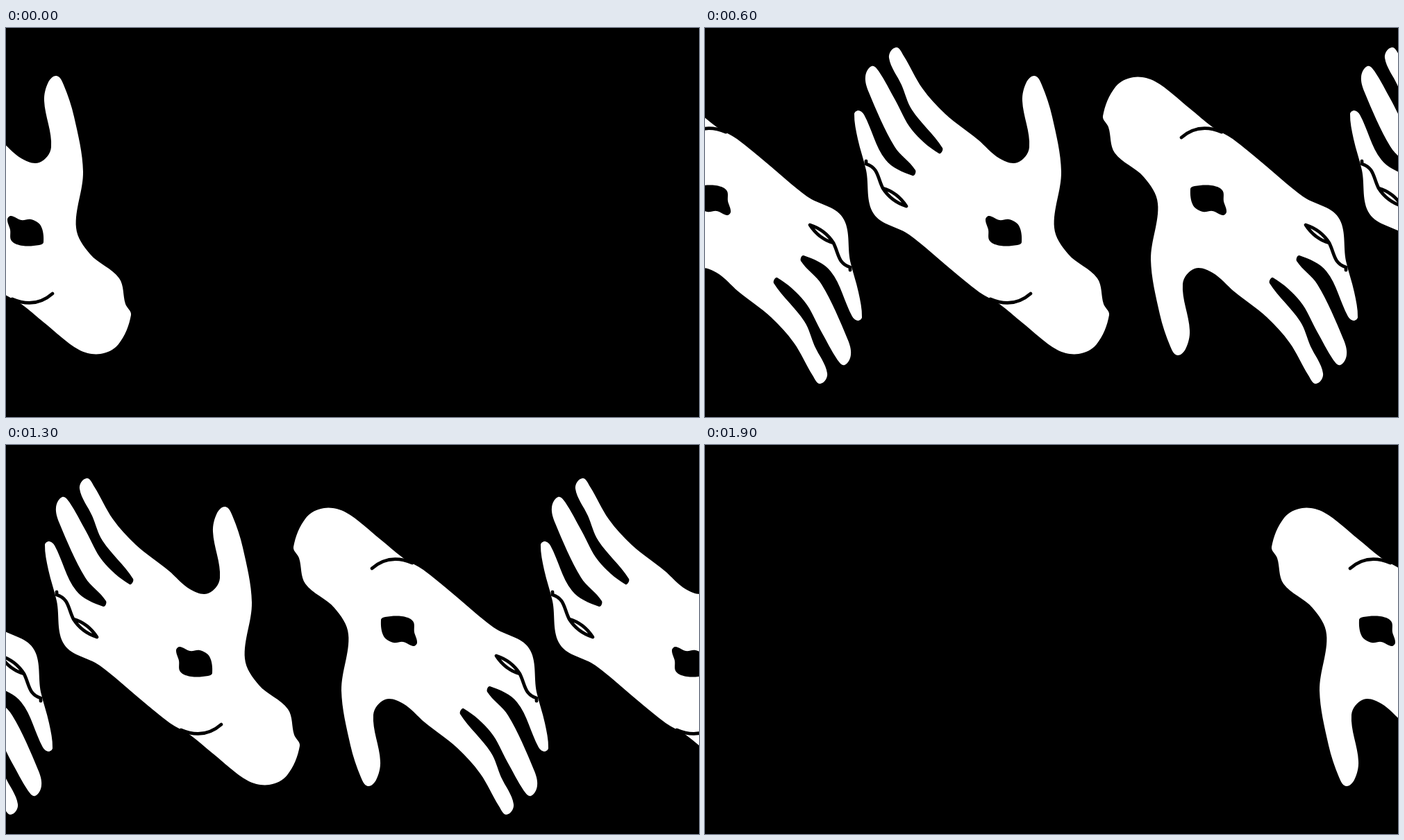
These frames come from a looping animation (998x561 px, 2000 ms). An HTML page:

```html
<!DOCTYPE html>
<html lang="en">
<head>
<meta charset="utf-8">
<title>Drifting hands</title>
<style>
  html, body { margin: 0; width: 100%; height: 100%; overflow: hidden; background: #000; }
  svg { display: block; width: 998px; height: 561px; }
  .ink { fill: none; stroke: #000; stroke-width: 4.8; stroke-linecap: round; stroke-linejoin: round; }
  #strip { animation: drift 2s steps(20) infinite; }
  @keyframes drift {
    from { transform: translateX(-744px); }
    to { transform: translateX(2976px); }
  }
</style>
</head>
<body>
<svg viewBox="0 0 998 561">
  <defs>
    <g id="hand">
      <path id="skin" fill="#fff"/>
      <path id="hole"/>
      <path class="ink" d="M753 391Q786 405 811 383"/>
      <path class="ink" d="M574 192V196C592 202 590 215 598 231Q619 237 632 257Q610 250 598 231"/>
    </g>
    <g id="pair">
      <use href="#hand"/>
      <use href="#hand" transform="rotate(180 562.5 270.5)"/>
    </g>
    <g id="group">
      <use href="#pair"/>
      <use href="#pair" x="-714"/>
    </g>
  </defs>
  <g id="strip">
    <use href="#group"/>
    <use href="#group" x="-1461" y="20"/>
  </g>
</svg>
<script>
  // Closed smooth curve: each tangent follows the neighbours, each handle is a third of its segment.
  function smooth(text) {
    const pts = text.trim().split(/\s+/).map(p => p.split(',').map(Number));
    const at = i => pts[(i + pts.length) % pts.length];
    const delta = (a, b) => [b[0] - a[0], b[1] - a[1]];
    const handle = (i, side) => {
      const [tx, ty] = delta(at(i - 1), at(i + 1));
      const reach = side * Math.hypot(...delta(at(i), at(i + side))) / 3 / Math.hypot(tx, ty);
      return [at(i)[0] + tx * reach, at(i)[1] + ty * reach];
    };
    return 'M' + pts[0] + pts.map((_, i) =>
      'C' + [handle(i, 1), handle(i + 1, -1), at(i + 1)].join(' ')).join('') + 'Z';
  }

  const outline = {
    index: '679,181 684,173 640,118 625,82 607,43 617,28 628,40 655,87 688,124',
    thumb: '735,161 766,188 792,194 809,172 799,105 805,78 817,69 827,82 842,128 855,207',
    wrist: '845,288 865,326 907,361 916,398 924,414 906,456 880,470 849,464 799,425',
    heel: '766,398 737,381 695,347 636,298 585,268',
    ring: '574,205 562,160 557,124 563,119 571,125 602,190 641,213 645,205',
    middle: '615,171 578,93 573,70 582,55 592,62 616,104 640,147'
  };
  const hole = '746,276 751,271 766,277 780,276 794,285 798,309 792,313 768,314 752,307 750,291';

  const draw = (id, points) => document.getElementById(id).setAttribute('d', smooth(points));
  draw('skin', Object.values(outline).join(' '));
  draw('hole', hole);
</script>
</body>
</html>
```
